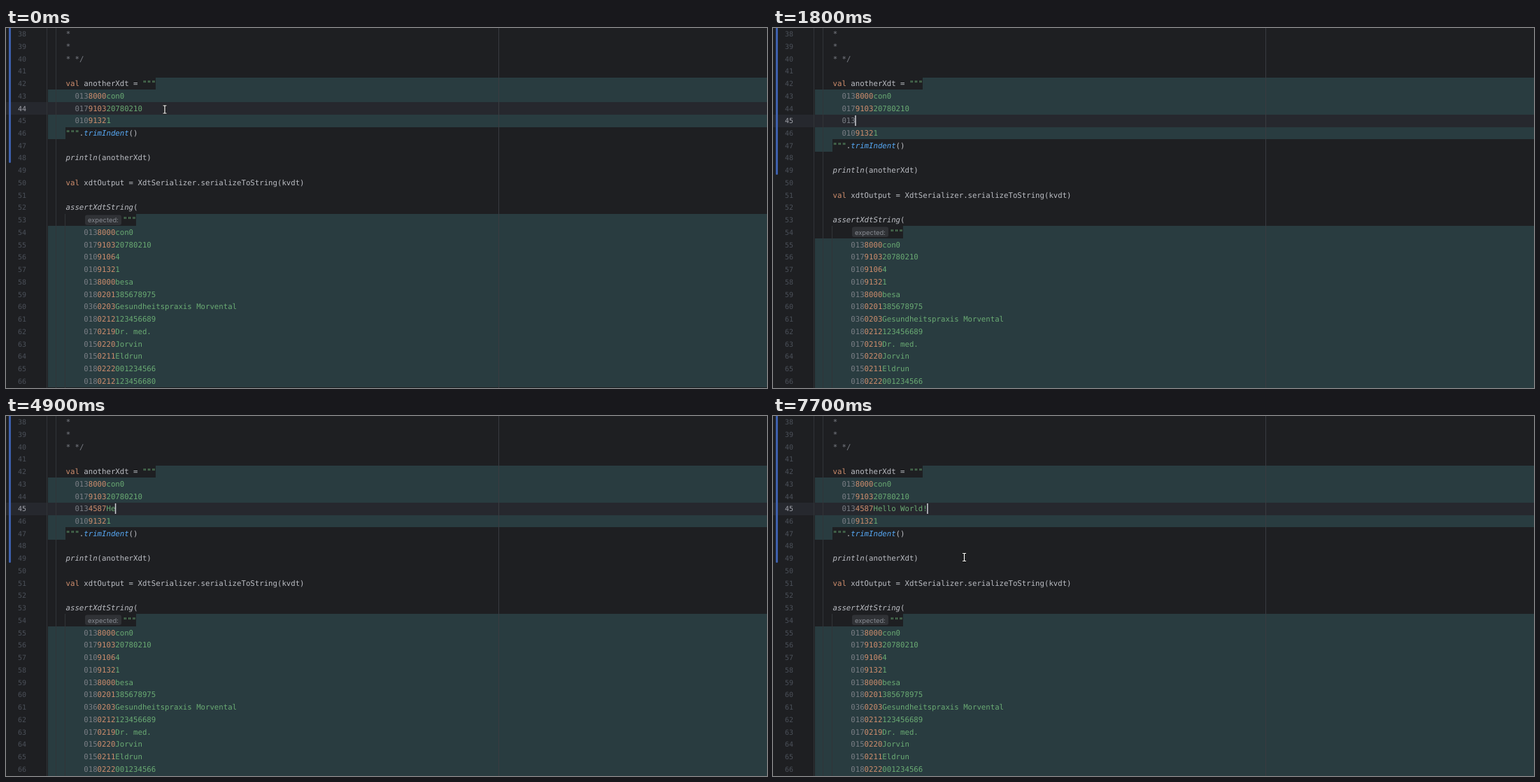
An HTML page with a canvas for the animation above (8000 ms loop, 1088x515 px).

```html
<!DOCTYPE html>
<html lang="en">
<head>
<meta charset="utf-8">
<title>Editor typing</title>
<style>
  html, body { margin: 0; width: 100%; height: 100%; overflow: hidden; background: #1e1f22; }
  canvas { display: block; }
</style>
</head>
<body>
<canvas id="stage" width="1088" height="515"></canvas>
<script>
const W = 1088, H = 515, LOOP = 8000;
const ROW = 17.74, LEFT = 59.8, CHAR = 6.434, FIRST_LINE = 38;
const MONO = '"DejaVu Sans Mono", monospace';
const C = {
  bg: '#1e1f22', current: '#26282e', teal: '#293c40', guide: '#313438', margin: '#393b40',
  text: '#bcbec4', key: '#cf8e6d', str: '#6aab73', grey: '#7a7e85', call: '#57aaf7',
  num: '#4b5059', numOn: '#a1a3ab', bar: '#3e60ad', caret: '#ced0d6', hint: '#303236'
};
const ctx = document.getElementById('stage').getContext('2d');

const rowTop = row => Math.round(row * ROW - 0.4);
const baseline = row => Math.round(row * ROW + 12.1);
const colX = col => LEFT + col * CHAR;

// A line: spans of [text, colour, italic], its start and the shaded range behind it
const line = (x, spans, shade) => ({ x, spans, shade });
const code = (...spans) => line(colX(4), spans);
const record = (col, s) => line(colX(col), [
  [s.slice(0, 3), C.grey], [s.slice(3, 7), C.key], [s.slice(7), C.str]
], [60, W]);
const blank = code();

const before = [
  code([' *', C.grey]), code([' *', C.grey]), code([' * */', C.grey]), blank,
  line(colX(4), [['val', C.key], [' anotherXdt = ', C.text], ['"""', C.str]], [214, W]),
  record(6, '0138000con0'),
  record(6, '017910320780210')
];
before.slice(0, 3).forEach(l => { l.x -= CHAR; l.x += 0.2; });
before.slice(0, 3).forEach(l => { l.x = colX(3) + 0.2; });

const after = [
  record(6, '01091321'),
  line(colX(4), [['"""', C.str], ['.', C.text], ['trimIndent', C.call, true], ['()', C.text]], [60, 85]),
  blank,
  code(['println', C.text, true], ['(anotherXdt)', C.text]),
  blank,
  code(['val', C.key], [' xdtOutput = XdtSerializer.serializeToString(kvdt)', C.text]),
  blank,
  code(['assertXdtString', C.text, true], ['(', C.text]),
  { ...line(167, [['"""', C.str]], [186, W]), hint: 'expected:' },
  ...['0138000con0', '017910320780210', '01091064', '01091321', '0138000besa',
    '0180201385678975', '0360203Gesundheitspraxis Morvental', '0180212123456689',
    '0170219Dr. med.', '0150220Jorvin', '0150211Eldrun', '0180222001234566',
    '0180212123456680'].map(s => record(8, s))
];

const TYPED = '0134587Hello World!';
const KEY_TIMES = [1400, 1500, 1600, 2900, 3100, 3700, 3900, 4700, 4900, 5100,
  5300, 5500, 5600, 6200, 6400, 6500, 6700, 6800, 7100];

function typedLine(t) {
  const s = TYPED.slice(0, KEY_TIMES.filter(k => t >= k).length);
  return line(colX(6), [
    [s.slice(0, 3), t >= 1800 ? C.grey : C.str],
    [s.slice(3, 5), t >= 4300 ? C.key : t >= 3500 ? C.text : C.str],
    [s.slice(5, 7), t >= 4300 ? C.key : C.str],
    [s.slice(7), C.str]
  ]);
}

function rect(color, x, y, w, h) {
  ctx.fillStyle = color;
  ctx.fillRect(x, y, w, h);
}

function pill(color, x, y, w, h, r) {
  ctx.fillStyle = color;
  ctx.beginPath();
  ctx.roundRect(x, y, w, h, r);
  ctx.fill();
}

function text(s, x, y, color, font) {
  ctx.font = font;
  ctx.fillStyle = color;
  ctx.fillText(s, x, y);
}

function drawLine(l, row) {
  let x = l.x;
  for (const [s, color, italic] of l.spans) {
    text(s, x, baseline(row), color, (italic ? 'italic ' : '') + '10.69px ' + MONO);
    x += s.length * CHAR;
  }
  if (l.hint) {
    pill(C.hint, 113, rowTop(row) + 1.5, 52, 14.5, 3);
    text(l.hint, 117, baseline(row), '#868a91', '9.4px Inter, sans-serif');
  }
}

function pointer(x, y) {
  ctx.beginPath();
  for (const end of [-5.5, 5.5]) {
    ctx.moveTo(x - 2.5, y + end);
    ctx.lineTo(x + 2.5, y + end);
  }
  ctx.moveTo(x, y - 5.5);
  ctx.lineTo(x, y + 5.5);
  for (const [color, width] of [['#111', 3], ['#fff', 1.2]]) {
    ctx.strokeStyle = color;
    ctx.lineWidth = width;
    ctx.stroke();
  }
}

function draw(t) {
  const split = t >= 900;
  const inserted = typedLine(t);
  const lines = split ? [...before, inserted, ...after] : [...before, ...after];
  const active = split ? 7 : 6;
  const callRow = lines.findIndex(l => l.hint);

  rect(C.bg, 0, 0, W, H);
  lines.forEach((l, row) => {
    const y = rowTop(row), h = rowTop(row + 1) - y;
    if (row === active) rect(C.current, 0, y, W, h);
    else if (l.shade) rect(C.teal, l.shade[0], y, l.shade[1] - l.shade[0], h);
  });

  rect(C.guide, 58, 0, 1, H);
  rect(C.guide, 71, 0, 1, H);
  rect(C.guide, 84, rowTop(callRow), 1, H);
  rect(C.margin, 704, 0, 1, H);
  pill(C.bar, 4, -5, 3, rowTop(split ? 12 : 11) + 3, 1.5);

  lines.slice(0, 29).forEach((l, row) => {
    text(FIRST_LINE + row, 17, baseline(row), row === active ? C.numOn : C.num, '10px ' + MONO);
    drawLine(l, row);
  });

  if (t >= 200) {
    const length = inserted.spans.reduce((n, [s]) => n + s.length, 0);
    rect(C.caret, colX(split ? 6 + length : 21) - 0.5, rowTop(active) + 1, 1.5, 15);
  }
  if (t < 1300) pointer(227, 116.5);
  else if (t >= 7700) pointer(273.5, 202);
  else if (t >= 7600) pointer(270.5, 175);
}

ctx.textRendering = 'geometricPrecision';
(function tick() {
  draw(performance.now() % LOOP);
  requestAnimationFrame(tick);
})();
</script>
</body>
</html>
```
